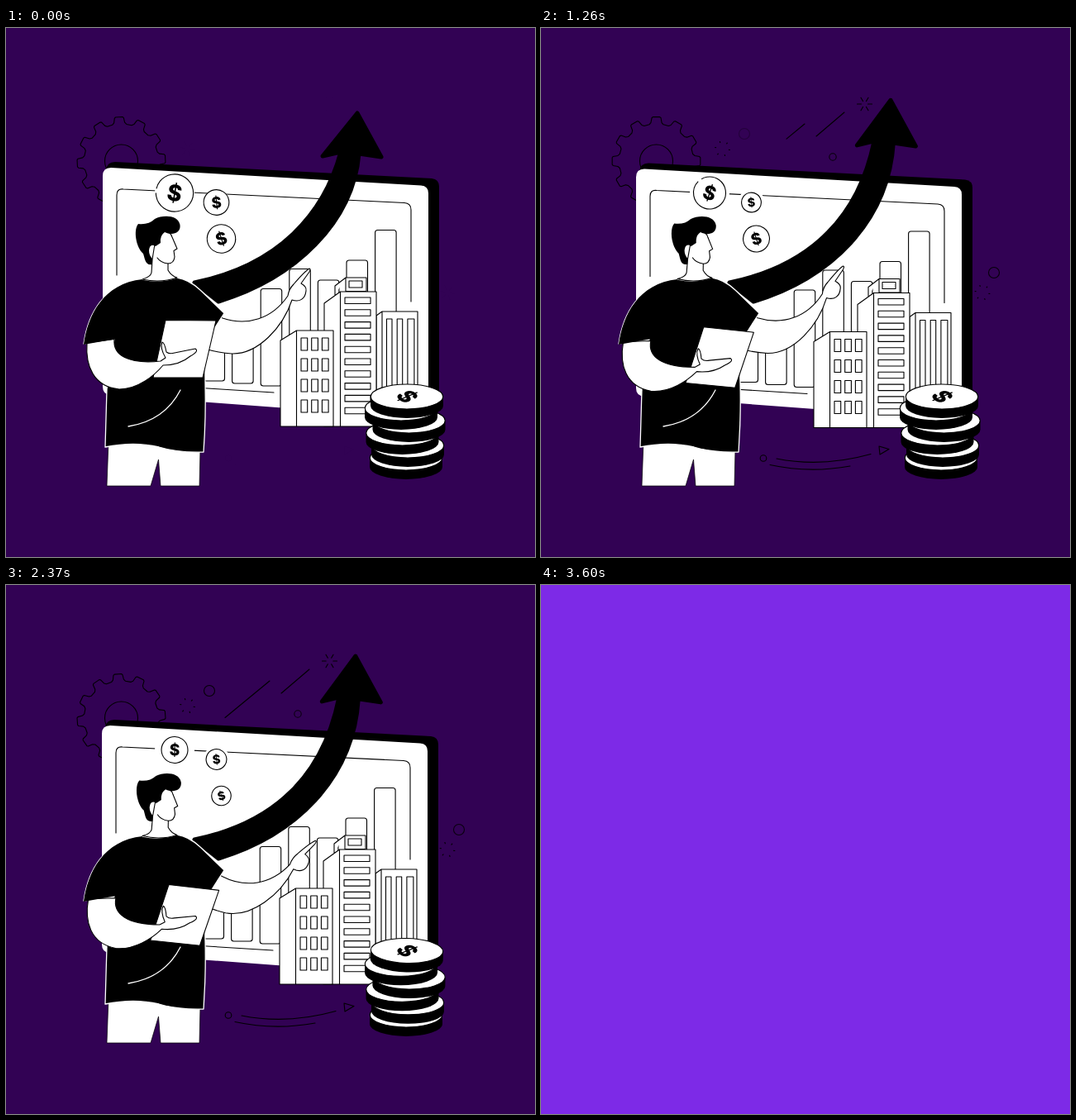
An HTML page that plays this animation: 640x640 px, repeating every 3630 ms.

```html
<!DOCTYPE html>
<html lang="en">
<head>
<meta charset="utf-8">
<title>Growth</title>
<style>
  html, body { margin: 0; width: 100%; height: 100%; overflow: hidden; }
  svg { display: block; width: 100vw; height: 100vh; }
  text { font: 800 24px Inter, Arial, sans-serif; text-anchor: middle; fill: #000; stroke: none; }
  .line { fill: none; stroke: #000; stroke-width: 1.1; stroke-linecap: round; stroke-linejoin: round; }
  .face { fill: #fff; stroke: #000; stroke-width: 1.1; stroke-linejoin: round; }
  .shirt { fill: #000; stroke: #fff; stroke-width: 1.3; stroke-linejoin: round; }
</style>
</head>
<body>
<svg viewBox="0 0 640 640">
  <rect id="back" width="640" height="640"/>
  <g id="scene">
    <g class="line">
      <path id="gear"/>
      <circle cx="139.500" cy="161" r="20"/>
      <g id="deco">
        <path id="streakA" pathLength="1"/>
        <path id="streakB" pathLength="1"/>
        <circle id="ring0" cx="246" cy="128" r="6.500"/>
        <circle id="ring1" cx="353" cy="156" r="4.200"/>
        <circle id="ring2" cx="548" cy="296" r="6.500"/>
        <path id="star0"/><path id="star1"/><path id="star2"/>
        <circle cx="269" cy="520.500" r="3.800"/>
        <path id="sweepA" pathLength="1" d="M285 521Q340 532 399 515.500"/>
        <path id="sweepB" pathLength="1" d="M277 528.500Q325 539 374 530"/>
        <path d="M409 506L421 509.500L410 516Z"/>
      </g>
    </g>

    <g id="board">
      <path d="M132 162L515 182Q524 183 524 192V455Q524 464 515 464L132 440Q121 439 121 430V172Q122 162 132 162Z"/>
      <path fill="#fff" d="M127 169L502 190.500Q511 191 511 200V464Q511 473 502 472L126 444Q117 443 117 434V179Q117 169 127 169Z"/>
      <path class="line" d="M134 299V202Q134 194 142 195L482 211.500Q490 212 490 220V331M236 435.500L324 441"/>
      <g id="bars" class="face"></g>
    </g>
    <path id="arrow" stroke="#000" stroke-width="5" stroke-linejoin="round"/>
    <g id="city" class="face"></g>
    <g id="badges"></g>

    <path id="arm" class="face" d="M240 340L262 351C292 361 322 352 341 324C342 317 344 314 348 310C354 303 362 294 367 291Q369 291 367 295L357 309Q364 313 363 318C362 328 355 332 346 329C335 362 305 395 273 394Q258 393 240 388Z"/>

    <path class="face" d="M124 500L122 554H175L184.500 522L187 554H234L235 510Z" style="stroke-width:.7"/>
    <path class="shirt" d="M165 304Q187 309 207 302Q221 304 235 317L264 345L246 373Q240 400 241 430Q242 470 239 513Q208 514 185 507Q155 500 120 507L122 437L131 376L94 382C99 347 118 309 165 304Z"/>
    <path fill="none" stroke="#fff" stroke-width="1.300" stroke-linecap="round" d="M148 482Q192 475 211 438"/>

    <g id="head">
      <path class="face" d="M165 304Q175 301 176 296L177 280L181 255L191 246Q199 246 201 253L207 267L203 269.500L204 277Q203 285 196 285L196 293Q200 300 207 302Q187 309 165 304Z"/>
      <path class="line" d="M196 285Q187 284 183 278"/>
      <path d="M177 286C168 288 168 278 166 273C157 265 154 244 160 237C168 238 175 236 180 231C190 226 208 226 210.500 238C212 249 200 251 192 247Q186 251 187 260L181 264Q174 260 173 269Q173 275 177 279Z"/>
    </g>

    <g id="forearm">
      <path class="face" d="M193 353.500L254 354L238 423H178Z"/>
      <path class="face" d="M97 381L131 376.500C129 396 148 407 187 403L193 399Q186 387 189 380Q192 381 194 392Q198 395 204 393L229 388Q234 391 223 397Q210 408 190 408C180 420 160 437 137 437C106 434 96 409 98 381Z"/>
    </g>
    <path d="M94 383C99 347 118 309 165 304L150 374L131 376.500Z"/>

    <g id="stack"></g>
  </g>
</svg>
<script>
const LOOP = 3630, END = 3600, BEAT = 1800, TAU = Math.PI * 2;
const $ = id => document.getElementById(id);
const set = (id, name, value) => $(id).setAttribute(name, value);
const clamp = v => Math.min(1, Math.max(0, v));
const ease = v => v < .5 ? 2 * v * v : 1 - 2 * (1 - v) ** 2;
const range = (n, f) => Array.from({ length: n }, (_, i) => f(i)).join('');
const rect = (x, y, w, h, r = 0) => `<rect x="${x}" y="${y}" width="${w}" height="${h}" rx="${r}"/>`;
const wave = (t, period, peak = 0) => Math.cos(TAU * t / period - peak * TAU / 360);

// Smooth interpolation through [time, value] keys
function track(t, keys) {
  const i = Math.max(1, keys.findIndex(k => k[0] >= t));
  const [t0, a] = keys[i - 1], [t1, b] = keys[i];
  return a + (b - a) * ease(clamp((t - t0) / (t1 - t0)));
}

// Twelve-tooth outline
const point = (r, deg) => [r * Math.sin(deg * TAU / 360), -r * Math.cos(deg * TAU / 360)].map(v => v.toFixed(1));
set('gear', 'd', 'M' + Array.from({ length: 12 }, (_, i) =>
  [[45, -11], [47, -8], [52.5, -6], [53.5, -4.5], [53.5, 4.5], [52.5, 6], [47, 8], [45, 11]]
    .map(([r, a]) => point(r, a + i * 30)).join('L')).join('L') + 'Z');

$('bars').innerHTML = [372, 372, 315.5, 291.5, 305, 281, 244.5]
  .map((y, i) => rect(239 + i * 34.6, y, 25.5, 427 + i * 3 - y, 3)).join('');

$('city').innerHTML =
  '<path d="M448 482V348L455 343H498V482ZM455 343V482"/>' +
  range(3, i => rect(460.5 + i * 12.7, 352, i === 2 ? 8 : 6.5, 100)) +
  '<path d="M385 482V333L404.500 319H448V482ZM404.500 319V482M398 323V312L411 302H436V318.500H411V302"/>' +
  rect(415, 306, 16, 8) +
  range(10, i => rect(410, 326 + i * 14.8, 31, 7.5)) +
  '<path d="M332 482V378L351.500 366H396V482ZM351.500 366V482"/>' +
  range(12, i => rect(357 + i % 3 * 12.7, 375 + Math.floor(i / 3) * 25, 7.7, 15));

// x, y, halo, mean radius, swing, peak angle
const badges = [[204, 199.5, 24, 19, 4, 335], [254.5, 211, 16, 13, 2.4, 10], [260.5, 255, 0, 14.7, 3.3, 320]];
$('badges').innerHTML = badges.map(([x, y, halo], i) =>
  `<circle cx="${x}" cy="${y}" r="${halo}" fill="#fff"/><g id="badge${i}">` +
  '<circle r="20" class="face" vector-effect="non-scaling-stroke" pathLength="100" stroke-dasharray="88 4 8 0" transform="rotate(-100)"/>' +
  `<text y="8.500" id="sign${i}">$</text></g>`).join('');

// x, rest y, lift, tilt; bottom coin first
const coins = [[484, 520, 0, 0], [486, 505, 4, 11], [479.5, 490, 17, -6], [487.5, 475, 22, 13], [478, 460, 37, -8], [485, 446, 77, 31]];
$('stack').innerHTML = coins.map((_, i) =>
  `<g id="coin${i}"><path d="M-44 0V11A44 15 0 0 0 44 11V0Z"/>` +
  '<ellipse rx="43.700" ry="15" class="face"/>' +
  '<g transform="scale(1 .6) rotate(55)"><text y="11" style="font-size:32px">$</text></g></g>').join('');

function star(id, x, y, turn, size) {
  const inner = 8.5 - 5 * size;
  set(id, 'd', range(6, i => {
    const a = (i * 60 + turn) * TAU / 360, c = Math.cos(a), s = Math.sin(a);
    return `M${x + 9 * c} ${y + 9 * s}L${x + inner * c} ${y + inner * s}`;
  }));
}

// Line grows from its first end, then shrinks towards its second
function streak(id, x0, y0, x1, y1, time) {
  const t = time < 0 ? 0 : time % 1500;
  const from = ease(clamp((t - 970) / 530)), to = clamp(t / 370);
  const at = k => `${x0 + (x1 - x0) * k} ${y0 + (y1 - y0) * k}`;
  set(id, 'd', to > from ? `M${at(from)}L${at(to)}` : '');
}

function draw(t) {
  set('back', 'fill', t < 2550 ? '#320254' : '#7d2ae7');
  set('scene', 'visibility', t < END ? 'visible' : 'hidden');

  const beat = t % BEAT;
  const swing = (1 - wave(t, BEAT)) / 2;
  const blink = (1 - wave(t, 900)) / 2;

  set('gear', 'transform', `translate(139.5 161) rotate(${t * .05 - 3})`);
  set('deco', 'opacity', clamp(t / 200));
  streak('streakA', 265, 160.5, 319, 116, t);
  streak('streakB', 333, 131, 367, 102, t - 290);
  set('ring0', 'opacity', (1 + wave(t, 900, 258)) / 2);
  set('ring1', 'opacity', blink);
  set('ring2', 'opacity', blink);
  star('star0', 219.5, 146, 10, 1 - blink);
  star('star1', 391.5, 92, 0, blink);
  star('star2', 534, 320, 10, 1 - blink);
  for (const id of ['sweepA', 'sweepB']) set(id, 'stroke-dasharray', `${clamp(t / 580)} 2`);

  const dx = track(t, [[0, 0], [750, 0], [1260, -2], [1680, -1], [2370, -1], [2730, -2], [3630, 0]]);
  const dy = track(t, [[0, 0], [750, .5], [1260, 1.5], [1680, 1], [2370, 1], [2730, 0], [3630, 0]]);
  for (const id of ['board', 'city']) set(id, 'transform', `translate(${dx} ${dy})`);

  const x = -3 * swing, y = -20 * swing;
  set('arrow', 'd', `M228 308C330 287 385 225 ${405 + x} ${150 + y}L${383 + x / 3} ${155 + y}` +
    `L${425 + x} ${103 - 24 * swing}L${454 + x / 3} ${156 + y}L${427 + x / 3} ${152 + y}C420 235 350 303 257 331Z`);

  badges.forEach(([bx, by, , r, amp, peak], i) => {
    set('badge' + i, 'transform', `translate(${bx} ${by}) scale(${(r + amp * wave(t, BEAT, peak)) / 20})`);
    set('sign' + i, 'transform', `rotate(${[10 + 10 * wave(t, END, 90), -6, -18][i]})`);
  });

  const point = track(t, [[0, 0], [900, -2], [1260, -1.5], [1680, 0], [2800, 12.5], [3630, 0]]);
  set('arm', 'transform', `rotate(${point} 252 348)`);
  set('forearm', 'transform', `rotate(${8.6 * swing} 111 396)`);
  set('head', 'transform', `rotate(${1.6 * swing} 186 303)`);

  const jump = Math.sin(Math.PI * clamp((beat - 525) / 670)) ** 2;
  coins.forEach(([cx, cy, lift, tilt], i) =>
    set('coin' + i, 'transform', `translate(${cx} ${cy - lift * jump}) rotate(${tilt * jump})`));
}

function tick() {
  draw(performance.now() % LOOP);
  requestAnimationFrame(tick);
}
tick();
</script>
</body>
</html>
```
